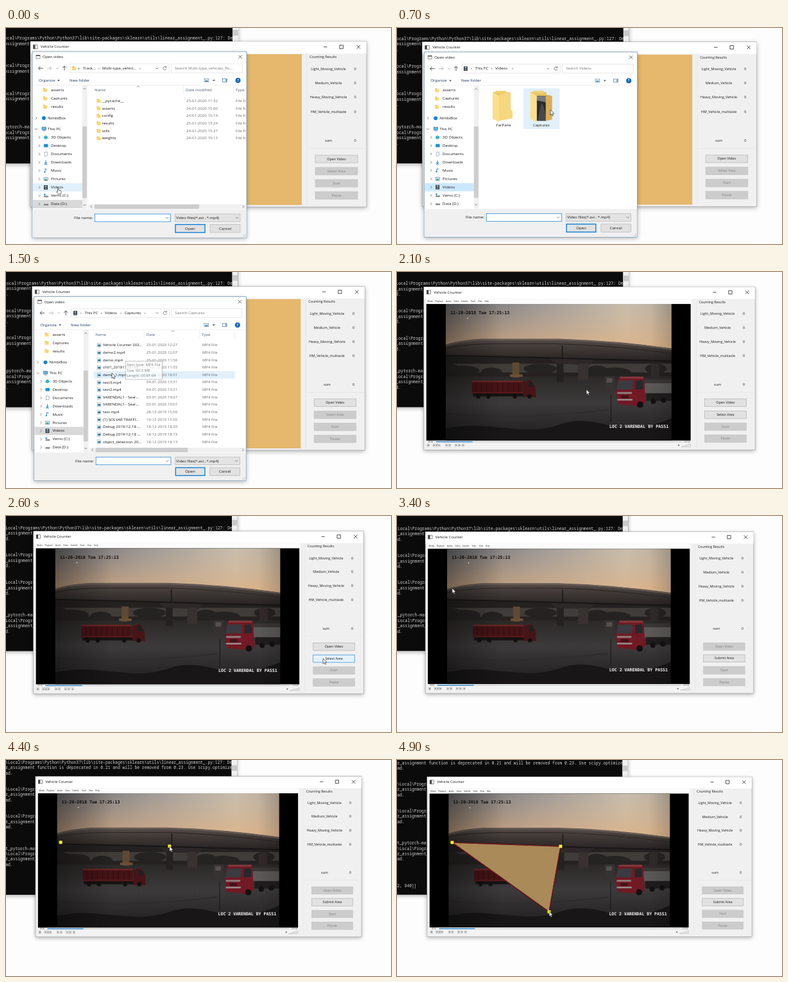
Animation, 600 px wide and 338 px high, one loop 5000 ms. Source, as an HTML page:

```html
<!DOCTYPE html>
<html lang="en">
<head>
<meta charset="utf-8">
<title>Vehicle counter demo</title>
<style>
html, body { margin: 0; width: 100%; height: 100%; overflow: hidden; background: #fdfdfe; }
svg { display: block; width: 100vw; height: 100vh; }
text { font-family: "Open Sans", "Noto Sans", sans-serif; white-space: pre; }
.mono { font-family: "Noto Sans Mono", "Liberation Mono", monospace; }
.osd { font-family: "DejaVu Sans Mono", "Liberation Mono", monospace; font-weight: bold; }
</style>
</head>
<body>
<svg id="stage" viewBox="0 0 600 338">
  <defs>
    <filter id="soft" x="-10%" y="-10%" width="120%" height="120%"><feGaussianBlur stdDeviation="3.5"/></filter>
    <filter id="haze"><feGaussianBlur stdDeviation="0.8"/></filter>
    <linearGradient id="sky">
      <stop offset="0" stop-color="#68686d"/><stop offset="0.4" stop-color="#9d9895"/>
      <stop offset="0.8" stop-color="#c8bdac"/><stop offset="1" stop-color="#b8ab9a"/>
    </linearGradient>
    <linearGradient id="glow" x1="0" y1="0" x2="0" y2="1">
      <stop offset="0" stop-color="#dcb48c" stop-opacity="0"/><stop offset="0.8" stop-color="#e4b07c" stop-opacity="0.6"/>
    </linearGradient>
    <linearGradient id="deck" x1="0" y1="0" x2="0" y2="1">
      <stop offset="0" stop-color="#554c48"/><stop offset="0.4" stop-color="#413a37"/><stop offset="1" stop-color="#272322"/>
    </linearGradient>
    <linearGradient id="road" x1="0" y1="0" x2="0" y2="1">
      <stop offset="0" stop-color="#2b2928"/><stop offset="0.4" stop-color="#3c3a3a"/><stop offset="0.9" stop-color="#232121"/>
    </linearGradient>
    <linearGradient id="shade">
      <stop offset="0" stop-color="#000" stop-opacity="0.35"/><stop offset="0.25" stop-color="#000" stop-opacity="0"/>
      <stop offset="0.9" stop-color="#000" stop-opacity="0"/><stop offset="1" stop-color="#000" stop-opacity="0.15"/>
    </linearGradient>
    <clipPath id="shot"><rect x="72.7" y="48.2" width="357" height="216.6"/></clipPath>
    <clipPath id="list"><rect x="127" y="89" width="246.5" height="194"/></clipPath>
  </defs>
  <g id="screen"></g>
</svg>
<script>
const LOOP = 5000, STEP = 100;
const CX = 300, CY = 176, SHRINK = 0.034 / 4900;
const ROW = 8.68, COL = 3.92;

const box = (x, y, w, h, fill, extra = '') =>
  `<rect x="${x}" y="${y}" width="${w}" height="${h}" fill="${fill}" ${extra}/>`;
const framed = (x, y, w, h, fill, edge, lw = 0.6) =>
  box(x, y, w, h, fill, `stroke="${edge}" stroke-width="${lw}"`);
const poly = (pts, fill, extra = '') => `<polygon points="${pts}" fill="${fill}" ${extra}/>`;
const path = (d, color, lw = 0.7, extra = '') =>
  `<path d="${d}" fill="none" stroke="${color}" stroke-width="${lw}" ${extra}/>`;
const shape = (d, fill) => `<path d="${d}" fill="${fill}"/>`;
const dot = (x, y, r, fill) => `<circle cx="${x}" cy="${y}" r="${r}" fill="${fill}"/>`;
// y is the middle of the line
const label = (x, y, s, size = 6.15, fill = '#1c1c1c', extra = '') =>
  `<text x="${x}" y="${y + size * 0.3}" font-size="${size}" fill="${fill}" ${extra}>${s}</text>`;
const mid = 'text-anchor="middle"';
const group = (id, body, extra = '') => `<g id="${id}" ${extra}>${body}</g>`;
const chevron = (x, y, color = '#555') => path(`M${x - 1} ${y - 2}l2 2l-2 2`, color);
const caret = (x, y, up, color = '#555') => path(`M${x - 2} ${y + up}l2 ${-2 * up}l2 ${2 * up}`, color);
const folder = (x, y) =>
  box(x - 3, y - 3, 3, 2, '#e9bb4a') + box(x - 3, y - 2, 6, 5, '#fbd770');
const shadow = (x, y, w, h) => box(x, y + 2, w, h, '#000', 'opacity="0.3" filter="url(#soft)"');

function consoleView() {
  const dir = 'ta\\Local\\Programs', fn = 'ear_assignment', end = 'tead.';
  const lines = {
    0: dir + '\\Python\\Python37\\lib\\site-packages\\sklearn\\utils\\linear_assignment_.py:127: De',
    1: fn + ' function is deprecated in 0.21 and will be removed from 0.23. Use scipy.optimize',
    2: end, 5: dir, 6: fn, 7: end, 10: dir, 11: fn, 12: end,
    16: 'ert_pytorch-master', 17: dir, 18: fn + '_', 19: end
  };
  const line = (row, s) =>
    label(-2.4 - 4 * COL, 16 + row * ROW, s, COL / 0.6, '#cfcfcf', 'class="mono"');
  const text = Object.entries(lines).map(([row, s]) => line(+row, s)).join('');
  return shadow(-30, -30, 392, 242) + box(-30, -30, 392, 242, '#0b0b0b') +
    group('log', text + group('coords', line(24, ' 32, 840]]'))) +
    box(353, -20, 9, 232, '#f0f0f0') + box(353.4, 3, 8.4, 9, '#cacaca');
}

function button(id, y, s) {
  return `<g id="${id}">${framed(482, y - 6, 66, 12, '#ccc', '#bfbfbf')}${label(515, y, s, 5.4, '#838383', mid)}</g>`;
}

function mainWindow() {
  const rows = [['Light_Moving_Vehicle', 64], ['Medium_Vehicle', 86], ['Heavy_Moving_Vehicle', 108.5],
    ['HM_Vehicle_multiaxle', 131], ['sum', 176]];
  return shadow(38, 21, 524, 259) + framed(38, 21, 524, 259, '#f0f0f1', '#9a9a9a') +
    box(38.3, 21.3, 523.4, 18.7, '#fff') + framed(42.5, 26.5, 6.5, 6, '#fff', '#444') + box(42.5, 26.5, 3, 6, '#444') +
    label(54, 29.6, 'Vehicle Counter', 6) +
    path('M495 29.6h5.5M520 26.9h5.4v5.4h-5.4zM546.5 26.8l5.6 5.6m0 -5.6l-5.6 5.6', '#222', 0.8) +
    box(42, 41, 419, 236, '#e5b86e') +
    path('M469 41V276M469 188.5H561', '#e2e2e3', 0.6) +
    label(473, 45.3, 'Counting Results', 5.4) +
    rows.map(([s, y]) => label(502.5, y, s, 5.5, '#1c1c1c', mid) + label(544, y, '0', 5.5, '#1c1c1c', mid)).join('') +
    button('open', 205, 'Open Video') + button('area', 224, 'Select Area') +
    button('start', 243, 'Start') + button('pause', 262, 'Pause');
}

function redTruck() {
  return box(114, 171, 80, 20, '#451316') + box(114, 170, 80, 2.5, '#6c2425') + box(114, 188, 82, 2, '#65191c') +
    box(116, 190, 82, 5, '#161313') +
    Array.from({ length: 9 }, (_, i) => box(120 + i * 8.5, 173, 1, 15, '#300e10')).join('') +
    poly('195,172 207,169 214,179 215,196 195,196', '#471417') + poly('203,172 208,172 212,180 204,181', '#201f22') +
    [124, 140, 182, 205].map(x => dot(x, 195, 3.4, '#121010')).join('');
}

function whiteTruck() {
  return box(387, 173, 44, 17, '#5b5957') + box(387, 168, 44, 6, '#393635') + box(390, 190, 41, 12, '#1f1d1d') +
    poly('346,165 386,164 389,204 381,211 345,207 342,188', '#711924') + box(348, 163.5, 37, 3, '#85393a') +
    poly('346,170 369,169 368,184 343,184', '#3a3b40') + poly('373,170 384,169 385,183 373,184', '#27272a') +
    box(344, 188, 23, 3, '#8d7f7d') + box(344, 199, 24, 2.5, '#98908d') + box(350, 193, 12, 5, '#45101a') +
    dot(380, 208, 5, '#121011') + dot(401, 203, 4.2, '#121011') + dot(417, 201, 4.2, '#121011') +
    box(333.5, 193, 1, 43, '#161515');
}

function videoView() {
  const soil = 'M72 246Q105 240 130 242T190 247T255 239T330 241T431 229V266H72Z';
  const scene = box(72, 48, 359, 218, '#262423') + box(72, 48, 359, 78, 'url(#sky)') + box(72, 48, 359, 78, 'url(#glow)') +
    box(72, 133, 359, 34, '#242120') + box(72, 143, 359, 14, '#403c39') +
    [78, 100, 145, 222, 312, 340, 405].map((x, i) =>
      `<ellipse cx="${x}" cy="${151 + i % 3 * 3}" rx="${17 + i % 2 * 9}" ry="8" fill="#252322"/>`).join('') +
    box(72, 163, 359, 103, 'url(#road)') +
    box(178, 141, 11, 24, '#604932') + box(174, 160, 20, 4, '#6b4f35') +
    box(248, 142, 11, 30, '#242120') + poly('236,133 308,136 300,145 245,143', '#2d2827') +
    box(282, 143, 16, 26, '#37312f') + box(397, 143, 13, 20, '#302b29') +
    box(324, 163, 16, 24, '#353231') + box(327, 166, 9, 7, '#55504e') +
    shape('M72 113Q92 106 128 103.5H250Q340 106 431 119V139L310 136L190 132.5L72 130Z', 'url(#deck)') +
    path('M72 114.5Q92 107.5 128 105H250Q340 107.5 431 120.5', '#685d57', 2) +
    path('M72 119Q100 112 150 111.5H245Q330 113 431 127', '#2c2725', 1.2) +
    path('M72 130L190 132.5L310 136L431 139', '#181515', 2) + path('M257 114V134', '#1d1a19', 1.8) +
    redTruck() + whiteTruck() +
    shape(soil, '#181616') + path('M72 222Q140 230 210 226T330 216', '#302e2d', 3) + box(72, 48, 359, 218, 'url(#shade)');
  const menu = ['Media', 'Playback', 'Audio', 'Video', 'Subtitle', 'Tools', 'View', 'Help'];
  const menuX = [43.5, 56, 73, 85.5, 97, 112, 123.5, 134];
  return box(41.5, 40.5, 420, 237, '#f3f3f4') + box(41.5, 40.5, 420, 8, '#fcfcfc') +
    menu.map((s, i) => label(menuX[i], 44.2, s, 3.1, '#333')).join('') +
    box(42, 48.2, 418, 216.8, '#000') +
    `<g clip-path="url(#shot)"><g filter="url(#haze)">${scene}</g></g>` + dot(107, 71, 0.9, '#d8d3cf') +
    label(80, 62.6, '11-20-2018 Tue 17:25:13', 6.76, '#0a0a0a', 'class="osd"') +
    label(331.5, 243, 'LOC 2 VARENDAL BY PASS1', 6.76, '#f4f4f4', 'class="osd"') +
    box(57, 266.2, 389, 1.6, '#d0d0d0') + box(57, 266.2, 58, 1.6, '#3f8fcd') +
    label(45, 267, '00:06', 3, '#444') + label(448, 267, '-1:07:02', 3, '#444') +
    [45, 54, 58, 62, 74, 79, 89, 94, 100].map((x, i) =>
      framed(x - 1.7, 270.5, 3.4, 4, i ? '#f5f5f5' : '#ddd', '#999', 0.4) + box(x - 0.7, 271.7, 1.4, 1.6, '#555')).join('') +
    box(440, 271.5, 2, 2, '#666') + poly('445,275 460,275 460,270.5', '#e1eae1', 'stroke="#999" stroke-width="0.4"');
}

const corners = [[78.4, 127.4], [253.4, 133.6], [234.8, 239.8]];
function areaView() {
  const outline = `M${corners.join('L')}Z`;
  return group('fill', poly(corners.join(' '), '#a98a58') + path(outline, '#2a0a0c', 1.3) +
    path(outline, '#c01426', 1.3, 'stroke-dasharray="1.2 1.2"')) +
    corners.map(([x, y], i) => group('mark' + i, box(x - 2.5, y - 2.5, 5, 5, '#ffff1e'))).join('');
}

function navPane() {
  const items = ['3D Objects', 'Desktop', 'Documents', 'Downloads', 'Music', 'Pictures', 'Videos', 'Vemo (C:)', 'Data (D:)'];
  const icon = (i, y) => [
    poly(`62,${y - 3} 65,${y - 1} 65,${y + 2} 62,${y + 3} 59,${y + 2} 59,${y - 1}`, '#3ab3c9'),
    box(59, y - 2.5, 6.5, 5, '#1e8fd6'),
    framed(60, y - 3, 4.5, 6, '#fff', '#7a8ea0'),
    path(`M62 ${y - 3}v5m-2.2 -2l2.2 2l2.2 -2M59.5 ${y + 3}h5`, '#1980d2', 1),
    path(`M61 ${y + 2}v-5l3 1`, '#1980d2', 0.9) + dot(60.3, y + 2, 1.1, '#1980d2'),
    framed(59, y - 2.5, 6.5, 5, '#bfe3f7', '#7a8ea0') + poly(`59,${y + 2.3} 62,${y - 0.5} 65,${y + 2.3}`, '#4c9b6b'),
    filmIcon(62, y),
    box(59, y, 7, 2.4, '#8a8a8a') + box(59, y - 3, 2.6, 2.2, '#2493df'),
    box(59, y - 0.5, 7, 2.6, '#8a8a8a')
  ][i];
  return ['asserts', 'Captures', 'results'].map((s, i) => folder(61, 97 + i * 13.1) + label(70, 97 + i * 13.1, s)).join('') +
    chevron(47, 141) + dot(59, 141, 3, '#1581d4') + label(65, 141, 'NimbiBox') +
    caret(47, 158, -1) + framed(56, 155, 6.5, 4.4, '#57b8ea', '#4d6c80') + box(57.5, 160.5, 4, 0.8, '#4d6c80') + label(65, 158, 'This PC') +
    items.map((s, i) => { const y = 171 + i * 13.07; return chevron(52, y) + icon(i, y) + label(70, y, s); }).join('') +
    box(119, 90, 7, 193, '#f0f0f0') + box(119, 154, 7, 112, '#cdcdcd') + caret(122.5, 95, 1) + caret(122.5, 277, -1);
}

function filmIcon(x, y) {
  return box(x - 3, y - 3.4, 6, 6.8, '#33383c') + box(x - 1.6, y - 2.6, 3.2, 2.2, '#8eb2c8') + box(x - 1.6, y + 0.4, 3.2, 2.2, '#6f8d9d');
}

const crumbs = (icon, parts, hint) => icon + parts.map(([x, s]) => label(x, 63, s)).join('') + label(263, 63, hint, 6.15, '#777');
const hBar = (x, w) => box(128, 276, 246, 7, '#f0f0f0') + box(x, 276, w, 7, '#cdcdcd') +
  chevron(370, 279.5) + path('M134 277.5l-2 2l2 2', '#555');
const head = (x, s) => label(x, 97, s, 6.15, '#4c607a');
const rule = x => box(x, 91, 0.6, 12, '#e2e2e2');

function projectList() {
  const rows = [['__pycache__', '25-01-2020 11:32'], ['asserts', '24-01-2020 15:00'], ['config', '24-01-2020 15:14'],
    ['results', '25-01-2020 13:24'], ['utils', '24-01-2020 15:27'], ['weights', '24-01-2020 15:13']];
  return crumbs(folder(106, 63), [[112, '«'], [120, 'Track...'], [144, '›'], [150, 'Multi-type_vehicl...'], [208, '›']], 'Search Multi-type_vehicles_flo...') +
    `<g clip-path="url(#list)">` + head(138, 'Name') + caret(206, 91.5, 1) + head(280, 'Date modified') + head(358, 'Type') + rule(276) + rule(354) +
    rows.map(([s, d], i) => { const y = 114 + i * 11.72;
      return folder(144.5, y) + label(149.5, y, s) + label(281, y, d, 6.1, '#6d6d6d') + label(358, y, 'File folder', 6.1, '#6d6d6d'); }).join('') +
    hBar(138, 163) + '</g>';
}

function bigFolder(x, inner = '') {
  return box(x - 17, 100, 25, 42, '#e8c45f') + box(x - 13, 98, 17, 4, '#f0cf70') + inner +
    poly(`${x - 17},100 ${x - 7},106 ${x - 7},147 ${x - 17},142`, '#fbdf8c') +
    (inner ? poly(`${x + 7},104 ${x + 17},106 ${x + 17},143 ${x + 7},145`, '#dcae55') :
      poly(`${x - 7},104 ${x + 11},100 ${x + 11},127 ${x + 14},130 ${x + 14},141 ${x - 7},145`, '#f7d77d'));
}

function videosList() {
  const photo = box(217, 106, 15, 39, '#292b2e') + poly('217,106 232,106 232,116 217,113', '#777a7c') + poly('219,145 224,119 227,119 232,138 232,145', '#47484a');
  return crumbs(filmIcon(106, 63), [[114, '›'], [121, 'This PC'], [146, '›'], [152.5, 'Videos'], [179, '›']], 'Search Videos') +
    bigFolder(165.5) + label(165.5, 152, 'FarPane', 6.15, '#1c1c1c', mid) +
    group('tile', box(196.5, 94, 56.5, 64, '#e1f0fb')) + bigFolder(224.5, photo) + label(224.5, 152, 'Captures', 6.15, '#1c1c1c', mid);
}

function capturesList() {
  const rows = [['Vehicle Counter 202...', '25-01-2020 12:27'], ['demo2.mp4', '25-01-2020 12:07'], ['demo.mp4', '25-01-2020 11:56'],
    ['ch01_20181120170...', '25-01-2020 11:55'], ['demo_1.mp4', '24-01-2020 18:51'], ['test3.mp4', '04-01-2020 13:31'],
    ['test2.mp4', '04-01-2020 13:21'], ['VARENDAL1 - Sear...', '03-01-2020 19:07'], ['VARENDAL1 - Sear...', '03-01-2020 19:07'],
    ['test.mp4', '28-12-2019 15:50'], ['(1) SOLVAR TRAFFI...', '19-12-2019 15:50'], ['Debug 2019-12-18 ...', '18-12-2019 18:20'],
    ['Debug 2019-12-18 ...', '18-12-2019 18:19'], ['object_detection 20...', '18-12-2019 18:13']];
  const tips = ['Item type: MP4 File', 'Size: 90.3 MB', 'Length: 00:01:04'];
  return crumbs(filmIcon(106, 63), [[114, '›'], [121, 'This PC'], [146, '›'], [152.5, 'Videos'], [177, '›'], [183.5, 'Captures'], [214, '›']], 'Search Captures') +
    head(137.5, 'Name') + head(218, 'Date') + head(305, 'Type') + caret(259.5, 91.5, -1) + rule(214) + rule(301.5) + rule(357) +
    group('rowHi', box(135, 155, 222, 11.7, '#e1f0fb')) +
    rows.map(([s, d], i) => { const y = 113.9 + i * 11.75;
      return framed(140.5, y - 3, 5.6, 6.4, '#fff', '#8c9aa5', 0.5) + box(141.5, y - 1.2, 4, 3.2, '#2d7fb8') +
        label(149.5, y, s) + label(218, y, d, 6.1, '#6d6d6d') + label(306, y, 'MP4 File', 6.1, '#6d6d6d'); }).join('') +
    hBar(138, 145) +
    group('tip', framed(185, 139, 58, 29, '#fff', '#767676') + tips.map((s, i) => label(187, 145 + i * 8.6, s, 6, '#575757')).join(''));
}

function dialog() {
  return shadow(41, 37, 334, 291) + framed(41, 37, 334, 291, '#fff', '#6d8fae', 0.7) +
    framed(47, 42.5, 6, 5.5, '#fff', '#555') + box(47, 42.5, 6, 1.5, '#555') + label(57, 45.5, 'Open video', 6) +
    path('M362.3 42.5l5.4 5.4m0 -5.4l-5.4 5.4', '#333', 0.7) +
    path('M57.5 63h-7m3 -3l-3 3l3 3', '#444', 0.9) + path('M64 63h7m-3 -3l3 3l-3 3', '#b5b5b5', 0.9) + caret(80, 63, -1, '#999') +
    path('M91 66.5v-7m-3 3l3 -3l3 3', '#444', 0.9) +
    framed(100, 56, 154, 14, '#fff', '#d9d9d9') + framed(257.5, 56, 111, 14, '#fff', '#d9d9d9') + caret(235, 63, -1) +
    path('M249.5 61.5a2.6 2.6 0 1 0 0.3 2.2M249.8 59.5v2.3h-2.3', '#555') +
    label(51, 82, 'Organize', 6.15, '#1f3a66') + poly('80,81 84,81 82,83.4', '#555') + label(99, 82, 'New folder', 6.15, '#1f3a66') +
    framed(309, 79.5, 7, 5, '#d8eaf6', '#6f8494') + box(310.5, 82, 4, 2, '#4f8fb8') + poly('322,81 326,81 324,83.4', '#555') +
    framed(337.5, 79.5, 7, 5, '#fff', '#3a5878') + box(342, 79.5, 2.5, 5, '#7fb0d0') +
    dot(361.5, 82, 4, '#0b66c0') + label(361.5, 82, '?', 5.6, '#fff', mid + ' font-weight="bold"') +
    box(41.5, 89, 333, 0.6, '#e5e5e5') + box(126.5, 90, 0.6, 193, '#eee') +
    group('navHi', box(42, 243, 77, 13, 'currentColor')) + group('dataHi', box(42, 269, 77, 13, '#d9d9d9')) + navPane() +
    group('project', projectList()) + group('videos', videosList()) + group('captures', capturesList()) +
    box(41.4, 283.5, 333.2, 44.2, '#f0f0f0') + label(106, 297, 'File name:') +
    framed(138.5, 291, 118, 12, '#fff', '#2d8ad8', 0.8) + caret(251, 297, -1) +
    framed(263.5, 291, 101.5, 12, '#e3e3e3', '#adadad') + label(265, 297, 'Video files(*.avi , *.mp4)', 6) + caret(360, 297, -1) +
    framed(264, 307.5, 46, 12.5, '#e1e1e1', '#0078d7', 1.3) + label(287, 314, 'Open', 6.15, '#1c1c1c', mid) +
    framed(318, 307.5, 47, 12.5, '#e1e1e1', '#adadad') + label(341.5, 314, 'Cancel', 6.15, '#1c1c1c', mid) +
    [[372, 325], [369.5, 325], [372, 322.5]].map(([x, y]) => box(x, y, 1.2, 1.2, '#aaa')).join('');
}

function pointer() {
  const ink = 'fill="#fff" stroke="#111" stroke-width="0.6"';
  const arrow = `<path d="M0 0V8.2L1.9 6.5L3.2 9.4L4.5 8.8L3.2 6H5.8Z" ${ink}/>`;
  const hand = `<path d="M0 0.8Q1 -0.4 1.6 0.8V4L5 4.8Q6 5.2 5.7 6.6L5 10H1L-1.8 6.4Q-1.6 5.3 0 6.3Z" ${ink}/>`;
  return group('pointer', group('arrow', arrow) + group('hand', hand));
}

document.getElementById('screen').innerHTML = consoleView() + mainWindow() +
  group('video', videoView()) + areaView() + group('dialog', dialog()) + pointer();

const el = id => document.getElementById(id);
const show = (id, on) => el(id).setAttribute('display', on ? 'inline' : 'none');

// time, x, y of the pointer's tip
const route = [[0, 80.5, 250], [200, 80.5, 250], [700, 238.7, 127.8], [900, 238.7, 127.8], [1300, 163.6, 157.8],
  [1800, 163.6, 157.8], [2500, 497.6, 223.9], [2700, 497.6, 223.9], [3400, 80.8, 111.5], [3650, 78.5, 127.4],
  [3800, 78.5, 127.4], [4250, 253.5, 133.8], [4450, 253.5, 133.8], [4750, 235, 239], [5000, 235, 239]];
const clicks = [3700, 4300, 4800];

function tipAt(t) {
  const i = route.findIndex(k => k[0] > t);
  const [a, b] = [route[i - 1], route[i]];
  const u = (t - a[0]) / (b[0] - a[0]), e = u * u * (3 - 2 * u);
  return [a[1] + (b[1] - a[1]) * e, a[2] + (b[2] - a[2]) * e];
}

function setButton(id, enabled, hover) {
  const [face, text] = el(id).children;
  face.setAttribute('fill', !enabled ? '#ccc' : hover ? '#e5f1fb' : '#e1e1e1');
  face.setAttribute('stroke', !enabled ? '#bfbfbf' : hover ? '#0078d7' : '#a8a8a8');
  text.setAttribute('fill', enabled ? '#1c1c1c' : '#838383');
}

function draw(t) {
  const s = 1 - SHRINK * t;
  el('screen').setAttribute('transform', `translate(${CX * (1 - s)} ${CY * (1 - s)}) scale(${s})`);
  const [x, y] = tipAt(t);
  const inside = (x0, y0, x1, y1) => x >= x0 && x <= x1 && y >= y0 && y <= y1;
  const view = t < 300 ? 'project' : t < 1000 ? 'videos' : 'captures';
  const loaded = t >= 2100, picking = t >= 2800;

  show('dialog', t < 1900);
  for (const v of ['project', 'videos', 'captures']) show(v, v === view);
  el('navHi').setAttribute('color', { project: '#e1f0fb', videos: '#cce8ff', captures: '#d9d9d9' }[view]);
  show('dataHi', view === 'project');
  show('tile', inside(196, 94, 253, 158));
  show('rowHi', inside(135, 155, 357, 167));
  el('tip').setAttribute('opacity', Math.min(1, Math.max(0, (t - 1200) / 400)));

  show('video', loaded);
  setButton('open', !picking, !picking && inside(482, 199, 548, 211));
  setButton('area', loaded, inside(482, 218, 548, 230));
  el('area').children[1].textContent = picking ? 'Submit Area' : 'Select Area';

  const count = clicks.filter(c => t >= c).length;
  corners.forEach((_, i) => show('mark' + i, i < count));
  show('fill', count === 3);
  show('coords', count === 3);
  el('log').setAttribute('transform', `translate(0 ${-ROW * count})`);

  const overNav = t < 1900 && inside(42, 90, 119, 283);
  show('hand', overNav);
  show('arrow', !overNav);
  el('pointer').setAttribute('transform', `translate(${x} ${y})`);
}

function tick() {
  draw(Math.floor(performance.now() % LOOP / STEP) * STEP);
  requestAnimationFrame(tick);
}
tick();
</script>
</body>
</html>
```
